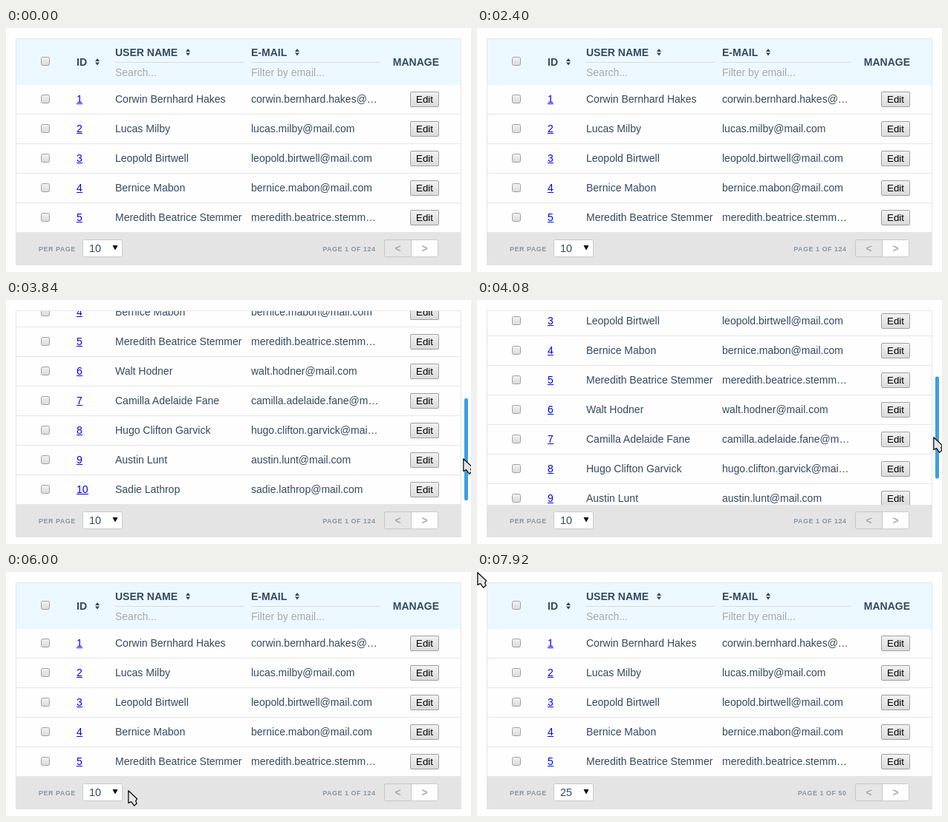
An HTML page that plays this animation: 626x330 px, repeating every 8 s.

```html
<!DOCTYPE html>
<html lang="en">
<head>
<meta charset="utf-8">
<title>User table</title>
<style>
html, body { margin: 0; width: 100%; height: 100%; overflow: hidden; background: #fefefe; }
svg { display: block; width: 626px; height: 330px; font: 14px "Liberation Sans", Arial, sans-serif; fill: #34495e; cursor: default; }
.bold { font-weight: bold; }
.hint { fill: #a9a9a9; }
.link { fill: #0000ee; }
.small { font-size: 9px; font-weight: bold; letter-spacing: .5px; fill: #8a96a0; }
.size { font-size: 14.4px; }
.edit { font-size: 13.333px; fill: #000; }
</style>
</head>
<body>
<svg id="stage" viewBox="0 0 626 330" xmlns="http://www.w3.org/2000/svg"></svg>
<script>
const LOOP = 8000, STEP = 120;
const ROW = 40, HEAD = 77, MAX_SCROLL = 200, BAR_TRAVEL = 113;
const POP_TOP = 214, POP_ROW = 18;
const EMAIL_WIDTH = 173;
const sizes = [10, 25, 50, 100];

const users = [
  "Corwin Bernhard Hakes", "Lucas Milby", "Leopold Birtwell", "Bernice Mabon",
  "Meredith Beatrice Stemmer", "Walt Hodner", "Camilla Adelaide Fane",
  "Hugo Clifton Garvick", "Austin Lunt", "Sadie Lathrop"
];

// pointer key points: time, x, y
const path = [
  [840, 352, 268], [1440, 307, 177], [2040, 311, 181], [2400, 640, 110],
  [2760, 619, 101], [4560, 613, 101], [4680, 595, 139], [5400, 566, 293],
  [6000, 164, 295], [6240, 141, 296], [7080, 128, 241], [7200, 128, 241],
  [7920, 572, 292]
];

const text = (x, y, s, cls = "", more = "") =>
  `<text x="${x}" y="${y}" class="${cls}" ${more}>${s}</text>`;
const rect = (x, y, w, h, fill, more = "") =>
  `<rect x="${x}" y="${y}" width="${w}" height="${h}" fill="${fill}" ${more}/>`;
const line = (d, color) => `<path d="${d}" fill="none" stroke="${color}"/>`;
const sortIcon = (x, y) =>
  `<path d="M${x - 3} ${y - .5}l3-4 3 4zM${x - 3} ${y + 1}l3 4 3-4z"/>`;
const checkbox = y =>
  rect(47.5, y - 5.5, 11, 11, "url(#face)", 'rx="2" stroke="#a0a0a0"');

const pen = document.createElement("canvas").getContext("2d");
pen.font = '14px "Liberation Sans", Arial, sans-serif';

function fit(s) {
  const wide = v => pen.measureText(v).width > EMAIL_WIDTH;
  if (!wide(s)) return s;
  while (wide(s + "…")) s = s.slice(0, -1);
  return s + "…";
}

function header() {
  return rect(14, 15, 598, 62, "#ecf8ff") + checkbox(45) +
    text(95, 51, "ID", "bold") + sortIcon(123, 45.5) +
    text(147, 38, "USER NAME", "bold") + sortIcon(245, 32.5) +
    text(330, 38, "E-MAIL", "bold") + sortIcon(392, 32.5) +
    text(583, 51, "MANAGE", "bold", 'text-anchor="end"') +
    line("M147 46.5h173M330 46.5h173", "#d8dcde") +
    text(147, 65, "Search...", "hint") + text(330, 65, "Filter by email...", "hint");
}

function row(name, i) {
  const y = HEAD + ROW * i, id = String(i + 1);
  const email = name.toLowerCase().replace(/ /g, ".") + "@mail.com";
  return checkbox(y + 19) + text(95, y + 24, id, "link") +
    line(`M95 ${y + 25.5}h${8 * id.length}`, "#0000ee") +
    text(147, y + 24, name) + text(330, y + 24, fit(email)) +
    rect(544.5, y + 9.5, 38, 20, "url(#face)", 'rx="1.5" stroke="#a0a0a0"') +
    text(563.5, y + 24, "Edit", "edit", 'text-anchor="middle"') +
    line(`M14 ${y + 39.5}h598`, "#e6e6e6");
}

function footer() {
  return rect(13, 277, 600, 44, "#e4e4e4") + text(44, 302, "PER PAGE", "small") +
    rect(103.5, 286.5, 53, 23, "#fff", 'rx="2" stroke="#cacaca"') +
    text(112, 303, "10", "size", 'id="size"') +
    '<path d="M143.5 294h7l-3.5 6.5z" fill="#000"/>' +
    text(497.5, 302, "", "small", 'id="pages" text-anchor="end"') +
    '<path id="next" d="M545.5 286.5h34q2 0 2 2v19q0 2-2 2h-34z" stroke="#cacaca"/>' +
    '<path d="M545.5 286.5h-34q-2 0-2 2v19q0 2 2 2h34z" fill="#e6e6e6" stroke="#c6c6c6"/>' +
    text(527.5, 303, "&lt;", "bold", 'text-anchor="middle" fill="#aaa"') +
    text(563.5, 303, "&gt;", "bold", 'text-anchor="middle" fill="#aaa"');
}

function popup() {
  return '<g id="popup">' + rect(103.5, 213.5, 53, 72, "#fff", 'stroke="#a9a9a9"') +
    rect(104, POP_TOP, 52, POP_ROW, "#1e90ff", 'id="pick"') +
    sizes.map((n, i) => text(112, POP_TOP + POP_ROW * i + 14, n, "option")).join("") + "</g>";
}

const stage = document.getElementById("stage");
stage.innerHTML = `<defs>
  <linearGradient id="face" x2="0" y2="1"><stop stop-color="#f2f2f2"/><stop offset="1" stop-color="#dadada"/></linearGradient>
  <clipPath id="view"><rect x="13" y="15" width="600" height="262"/></clipPath></defs>` +
  rect(0, 0, 626, 330, "#fefefe") +
  `<g clip-path="url(#view)"><g id="list">${rect(14, 0, 598, 39, "#f4f4f4", 'id="hover"')}
  ${header()}${users.map(row).join("")}</g></g>` +
  line("M13 14.5h600M13.5 14v307M612.5 14v307", "#e6e6e6") + footer() +
  rect(617, 20, 5, 138, "#e8e8e8", 'id="bar" rx="2"') + popup() +
  `<g id="cursor" stroke="#111" stroke-width="1.3" stroke-linejoin="round" fill="#e4e4e4">
  <path id="arrow" d="M.8.8V17.4L4.6 15.6 8.6 21.2 12.1 18 10.6 14.8 12.5 11.8Z"/>
  <path id="hand" d="M-2 1.5a2 2 0 0 1 4 0V7l7 1.3q2.6.6 2.3 3.2l-1 5v4h-9v-3.5l-5-6q-1.6-2.4.6-2.8l1.1 1z"/></g>`;

const el = {};
stage.querySelectorAll("[id]").forEach(n => el[n.id] = n);
const options = stage.querySelectorAll(".option");

const show = (node, on) => node.setAttribute("display", on ? "inline" : "none");
const clamp = (v, a, b) => Math.min(b, Math.max(a, v));
const ease = (t, a, b) => {
  const k = clamp((t - a) / (b - a), 0, 1);
  return k * k * (3 - 2 * k);
};
// rises from 0 to 1 and falls back
const hump = (t, a, top, b) => ease(t, a, top) - ease(t, top, b);

function pointer(t) {
  const i = clamp(path.findIndex(p => p[0] > t), 0, path.length);
  const b = path[i] && i ? path[i] : path[path.length - 1];
  const a = i ? path[i - 1] : b;
  const k = ease(t, a[0], b[0]);
  return [a[1] + (b[1] - a[1]) * k, a[2] + (b[2] - a[2]) * k];
}

function draw(time) {
  const t = Math.floor(time / STEP) * STEP;
  const scroll = Math.round(MAX_SCROLL * (hump(t, 1440, 1800, 2160) + hump(t, 2880, 3840, 4560)));
  const barShift = scroll * BAR_TRAVEL / MAX_SCROLL;
  const visible = (t >= 840 && t < 2400) || t >= 2760;
  const dragging = t >= 2760 && t < 4680;
  let [x, y] = pointer(t);
  x = Math.round(x);
  y = Math.round(y + (dragging ? barShift : 0));

  const inTable = visible && y < 277 && t < 5500;
  const index = Math.floor((y + scroll - HEAD) / ROW);
  el.list.setAttribute("transform", `translate(0 ${-scroll})`);
  show(el.hover, inTable && x < 613 && index >= 0 && (t < 2400 || t > 4680));
  el.hover.setAttribute("y", HEAD + ROW * index);
  show(el.bar, inTable);
  el.bar.setAttribute("y", 20 + barShift);
  el.bar.setAttribute("fill", dragging ? "#3a9fe5" : "#e8e8e8");

  const pick = y < 286 ? clamp(Math.floor((y - POP_TOP) / POP_ROW), 0, 3) : 0;
  show(el.popup, t >= 6360 && t < 7320);
  el.pick.setAttribute("y", POP_TOP + POP_ROW * pick);
  options.forEach((o, i) => o.setAttribute("fill", i === pick ? "#fff" : "#34495e"));

  const changed = t >= 7320;
  el.size.textContent = changed ? 25 : 10;
  el.pages.textContent = "PAGE 1 OF " + (changed ? 50 : 124);

  const onNext = changed && x > 545 && y >= 286;
  el.next.setAttribute("fill", onNext ? "#f2f2f2" : "#fff");
  show(el.cursor, visible);
  show(el.arrow, !onNext);
  show(el.hand, onNext);
  el.cursor.setAttribute("transform", `translate(${x} ${y})`);
}

const start = performance.now();
function tick() {
  draw((performance.now() - start) % LOOP);
  requestAnimationFrame(tick);
}
tick();
</script>
</body>
</html>
```
